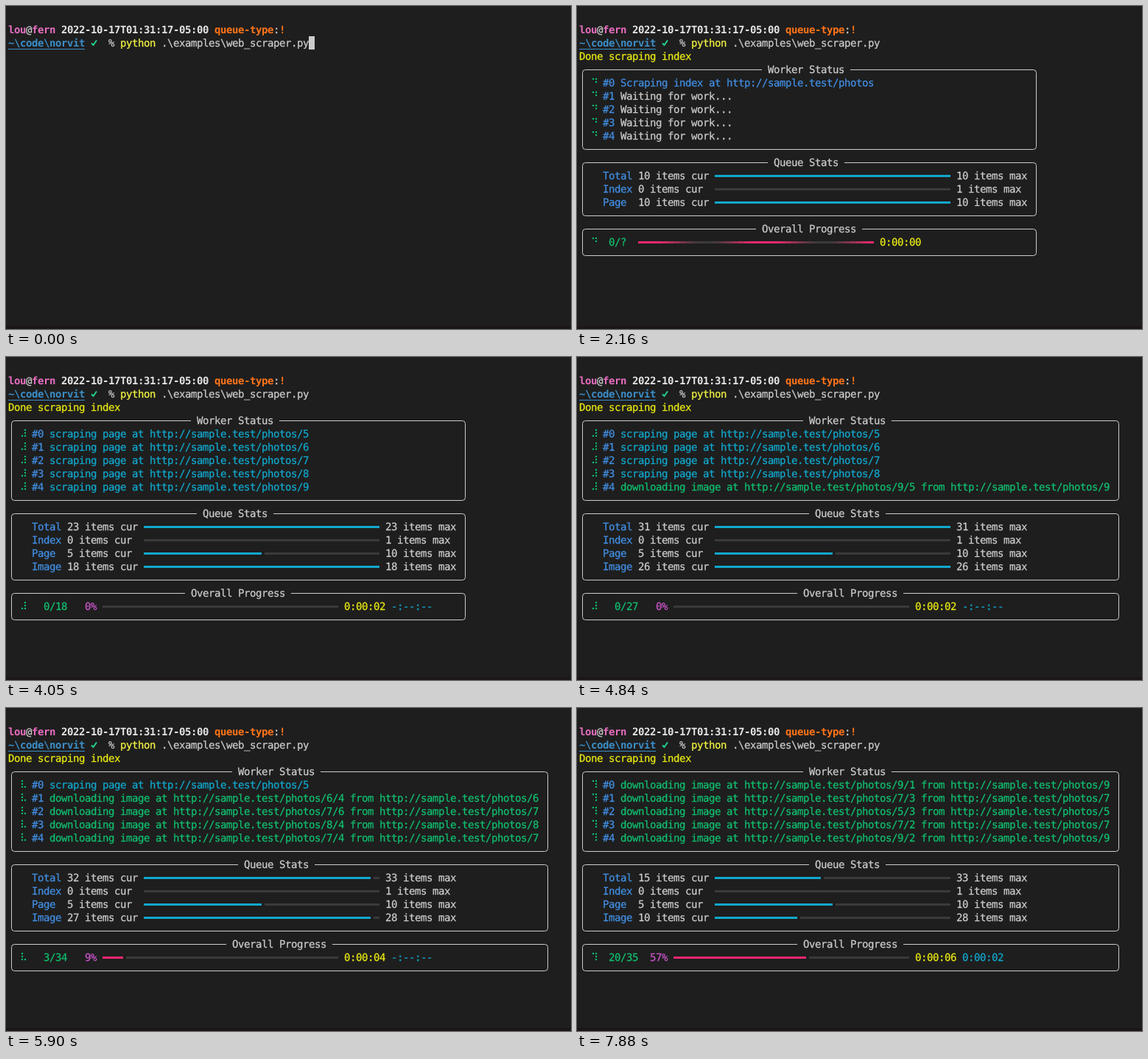
Animation, 767 px wide and 438 px high, one loop 8 s. Source, as an HTML page:

```html
<!DOCTYPE html>
<html lang="en">
<head>
<meta charset="utf-8">
<title>Scraper progress</title>
<style>
html, body { margin: 0; width: 100%; height: 100%; overflow: hidden; background: #1e1e1e; }
svg { display: block; }
text {
  font: 14px "DejaVu Sans Mono", monospace; letter-spacing: -.43px; text-rendering: geometricPrecision;
  fill: currentColor; stroke: currentColor; stroke-width: .25px;
}
.b { font-weight: bold; stroke: none; }
</style>
</head>
<body>
<svg id="screen" width="767" height="438" viewBox="0 0 767 438"></svg>
<script>
const LOOP = 8000, URL_BASE = 'http://sample.test/photos';
const BG = '#1e1e1e', FG = '#cccccc', TRACK = '#3a3a3a', PINK = '#f92672', ROSE = '#e86dc0',
  BLUE = '#428fe4', CYAN = '#11a8cd', GREEN = '#10c070', YELLOW = '#ebeb12', ORANGE = '#ff7418';

// [time, images found, images done, what each worker is on]
const PAGES = '5 6 7 8 9';
const steps = [
  [2090, 0, 0], [2160, 0, 0],
  [2420, 1, 0, PAGES], [2690, 3, 0, PAGES], [2950, 4, 0, PAGES], [3220, 7, 0, PAGES],
  [3490, 11, 0, PAGES], [3780, 15, 0, PAGES], [4050, 18, 0, PAGES], [4310, 21, 0, PAGES],
  [4580, 24, 0, PAGES],
  [4840, 27, 0, '5 6 7 8 9/5'],
  [5100, 30, 0, '5 9/4 7 8 9/5'],
  [5370, 30, 1, '5 9/4 7 8 9/6'],
  [5630, 32, 2, '5 6/4 7/6 8 9/6'],
  [5900, 34, 3, '5 6/4 7/6 8/4 7/4'],
  [6170, 35, 4, '5/6 6/4 5/5 8/4 7/4'],
  [6500, 35, 6, '8/3 6/4 5/5 8/6 7/4'],
  [6760, 35, 8, '8/3 8/5 7/5 8/6 7/4'],
  [7030, 35, 11, '6/5 8/5 6/3 8/6 8/2'],
  [7290, 35, 14, '5/4 6/2 6/3 5/2 8/2'],
  [7620, 35, 17, '5/4 7/3 5/3 5/2 9/3'],
  [7880, 35, 20, '9/1 7/3 5/3 7/2 9/2']
];

// Queue length and its peak so far follow from the counts.
let peak = 0;
const states = steps.map(([time, found, done, work]) => {
  const active = work ? work.split('/').length - 1 : 0;
  const queued = found - done - active;
  peak = Math.max(peak, queued);
  return { time, found, done, work, active, queued, peak };
});

// The terminal grid has cells of 8 by 18 pixels.
const colX = c => 3 + 8 * c;
const rowY = r => 23 + 18 * r;

const rect = (x, y, w, h, fill) => `<rect x="${x}" y="${y}" width="${w}" height="${h}" fill="${fill}"/>`;
const text = (c, r, s, color = FG, bold) =>
  `<text x="${colX(c)}" y="${rowY(r) + 14}" color="${color}"${bold ? ' class="b"' : ''}>${s}</text>`;
const cursor = (c, r) => rect(colX(c), rowY(r), 8, 18, FG);

function panel(top, bottom, right, title) {
  const size = title.length + 2, left = Math.floor((right - 3 - size) / 2) + 2;
  return `<rect x="7.5" y="${rowY(top) + 9.5}" width="${8 * right}" height="${18 * (bottom - top)}" rx="4" fill="none" stroke="${FG}"/>` +
    rect(colX(left), rowY(top) + 8, 8 * size, 3, BG) + text(left + 1, top, title);
}

const line = (x, r, w, fill) => rect(x, rowY(r) + 8, w, 3, fill);

// Bars grow by half a cell and leave a half-cell gap before the track.
function bar(c, r, part, fill) {
  const x = colX(c), w = 4 * Math.floor(80 * part);
  const start = w && w < 320 ? w + 4 : w;
  return line(x, r, w, fill) + line(x + start, r, 320 - start, TRACK);
}

function pulse(c, r, time) {
  const shift = 9 - Math.floor((time - 2160) * 0.015);
  const from = [249, 38, 114];
  let out = '';
  for (let i = 0; i < 40; i++) {
    const fade = 0.5 + Math.cos((i + shift) * Math.PI / 10) / 2;
    const rgb = from.map(v => Math.round(v + (58 - v) * fade));
    out += line(colX(c + i), r, 8, `rgb(${rgb})`);
  }
  return out;
}

// Each spinner pose lists braille dots: 0-2 down the left, 3-5 down the right.
const poses = ['013', '034', '0345', '345', '2345', '245', '125', '0125', '012', '0123'];
function spinner(r, time) {
  const pose = poses[Math.floor((time - 2075) / 80) % 10];
  return [...pose].map(d =>
    `<circle cx="${d < 3 ? 22 : 26}" cy="${rowY(r) + 4 + 4 * (d % 3)}" r="1.2" fill="${GREEN}"/>`).join('');
}

const prompt =
  rect(0, 434, 767, 4, '#1c1519') +
  text(0, 0, 'lou', ROSE, 1) + text(3, 0, '@') + text(4, 0, 'fern', ROSE, 1) +
  text(9, 0, '2022-10-17T01:31:17-05:00', '#e5e5e5', 1) +
  text(35, 0, 'queue-type', ORANGE, 1) + text(45, 0, ':') + text(46, 0, '!', ORANGE, 1) +
  text(0, 1, '~\\code\\norvit', '#3b8ec8', 1) + rect(3, 58, 104, 1, '#3b8ec8') +
  '<path d="M116 50.5l2.5 2.5 4.5-6.5" fill="none" stroke="#23d18b" stroke-width="2"/>' +
  text(17, 1, '%') + text(19, 1, 'python', '#f5f543') + text(26, 1, '.\\examples\\web_scraper.py');

function workerText(s, i) {
  if (!s.work) return i ? ['Waiting for work...', FG] : [`Scraping index at ${URL_BASE}`, BLUE];
  const job = s.work.split(' ')[i];
  return job.includes('/')
    ? [`downloading image at ${URL_BASE}/${job} from ${URL_BASE}/${job[0]}`, GREEN]
    : [`scraping page at ${URL_BASE}/${job}`, CYAN];
}

const clock = sec => `0:00:0${sec}`;

function overall(s, r) {
  const secs = clock(Math.floor((s.time - 1850) / 1000));
  if (s.found < 2)
    return text(5, r, '0/?', GREEN) + pulse(10, r, s.time) + text(51, r, secs, YELLOW);
  const digits = String(s.found).length, pc = 6 + 2 * digits + 1;
  const part = s.done / s.found, percent = Math.round(100 * part) + '%';
  const count = `${s.done}/${s.found}`;
  const eta = s.done < 14 ? '-:--:--' : clock(s.done < 17 ? 3 : 2);
  return text(pc - 1 - count.length, r, count, GREEN) +
    text(pc + 4 - percent.length, r, percent, '#cb55cb') +
    bar(pc + 5, r, part, PINK) + text(pc + 46, r, secs, YELLOW) + text(pc + 54, r, eta, CYAN);
}

function dashboard(s) {
  const pages = s.work ? 5 : 10, total = pages + s.queued;
  const queues = [['Total', total, Math.max(10, 5 + s.peak)], ['Index', 0, 1], ['Page', pages, 10]];
  if (s.work) queues.push(['Image', s.queued, s.peak]);
  const barCol = total > 9 ? 23 : 22, right = s.active ? 91 : barCol + 54;
  const queueEnd = 11 + queues.length;

  let out = text(0, 2, 'Done scraping index', YELLOW) + panel(3, 9, right, 'Worker Status');
  for (let i = 0; i < 5; i++)
    out += spinner(4 + i, s.time) + text(4, 4 + i, '#' + i, BLUE) + text(7, 4 + i, ...workerText(s, i));

  out += panel(10, queueEnd, right, 'Queue Stats');
  queues.forEach(([name, cur, max], i) => {
    const r = 11 + i;
    out += text(4, r, name, BLUE) + text(10, r, cur + ' items cur') +
      bar(barCol, r, cur / max, CYAN) + text(barCol + 41, r, max + ' items max');
  });

  return out + panel(queueEnd + 1, queueEnd + 3, right, 'Overall Progress') +
    spinner(queueEnd + 2, s.time) + overall(s, queueEnd + 2);
}

const scenes = [
  [0, prompt + cursor(51, 1)],
  [1500, prompt + cursor(0, 2)],
  [1760, prompt],
  ...states.map(s => [s.time, prompt + dashboard(s)])
];

const screenEl = document.getElementById('screen');
let shown;
function draw() {
  const t = performance.now() % LOOP;
  const scene = scenes.filter(([time]) => time <= t).pop();
  if (scene !== shown) screenEl.innerHTML = (shown = scene)[1];
  requestAnimationFrame(draw);
}
draw();
</script>
</body>
</html>
```
